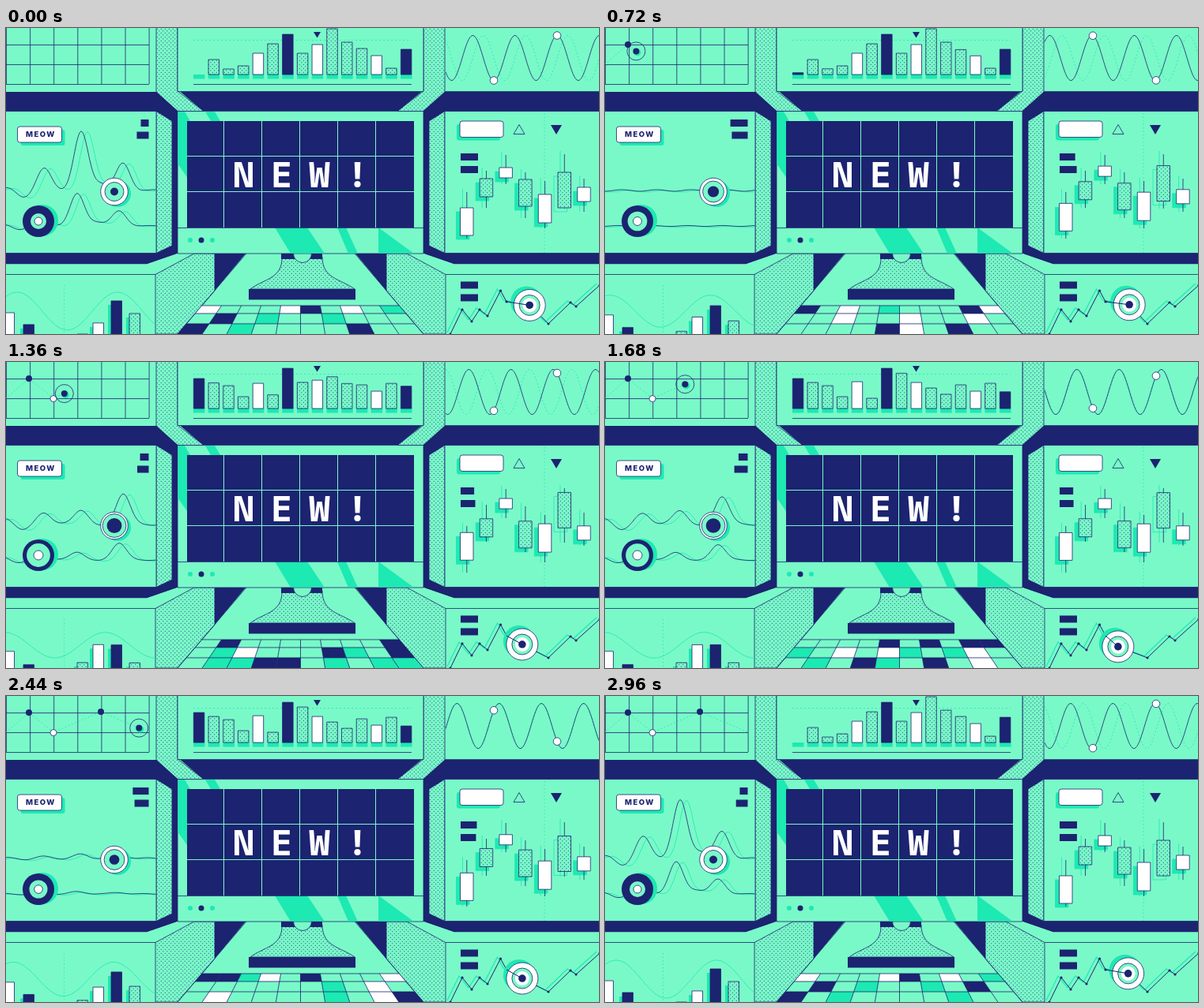
These frames come from a looping animation (750x388 px, 3 s). An HTML page with a canvas:

```html
<!DOCTYPE html>
<html lang="en">
<head>
<meta charset="utf-8">
<title>Dashboard wall</title>
<style>
html, body { margin: 0; width: 100%; height: 100%; overflow: hidden; background: #79f9c8 }
canvas { display: block }
</style>
</head>
<body>
<canvas id="stage" width="750" height="388"></canvas>
<script>
const c = document.getElementById('stage').getContext('2d');
const MINT = '#79f9c8', TEAL = '#1de9b2', NAVY = '#1c2370', WHITE = '#fff';
const LOOP = 3000, TAU = Math.PI * 2;

const tile = document.createElement('canvas');
tile.width = tile.height = 5;
const tc = tile.getContext('2d');
tc.fillStyle = MINT;
tc.fillRect(0, 0, 5, 5);
tc.fillStyle = NAVY;
for (const p of [1.25, 3.75]) {
  tc.beginPath();
  tc.arc(p, p, .55, 0, TAU);
  tc.fill();
}
const DOTS = c.createPattern(tile, 'repeat');

// Motion: a seeded random number, an eased ramp and a cosine that fits the loop.
const random = n => { const s = Math.sin(n * 12.9898 + 4) * 43758.5453; return s - Math.floor(s); };
const ramp = (t, from, to) => {
  const u = Math.min(1, Math.max(0, (t - from) / (to - from)));
  return u * u * (3 - 2 * u);
};
const sway = (t, delay = 0, turns = 1) => Math.cos((t - delay) / LOOP * TAU * turns);
const breath = t => .5 - .5 * sway(t);

function paint(fill, stroke, width = .8) {
  if (fill) { c.fillStyle = fill; c.fill(); }
  if (stroke) { c.strokeStyle = stroke; c.lineWidth = width; c.stroke(); }
}
function trace(pts) {
  c.beginPath();
  pts.forEach(([x, y]) => c.lineTo(x, y));
}
function poly(pts, fill, stroke) { trace(pts); c.closePath(); paint(fill, stroke); }
function line(pts, color = NAVY, dash = [], width) {
  c.setLineDash(dash);
  trace(pts);
  paint(null, color, width);
  c.setLineDash([]);
}
function box(x, y, w, h, fill, stroke, r = 0) {
  c.beginPath();
  c.roundRect(x, y, w, h, r);
  paint(fill, stroke);
}
function disc(x, y, r, fill, stroke) {
  c.beginPath();
  c.arc(x, y, r, 0, TAU);
  paint(fill, stroke);
}
function both(pts, fill, stroke) {
  poly(pts, fill, stroke);
  poly(pts.map(([x, y]) => [745 - x, y]), fill, stroke);
}
function curve(x0, x1, f, color, dash) {
  const pts = [];
  for (let x = x0; x <= x1; x++) pts.push([x, f(x)]);
  line(pts, color, dash);
}
function clip(x, y, w, h, draw) {
  c.save();
  c.beginPath();
  c.rect(x, y, w, h);
  c.clip();
  draw();
  c.restore();
}
function button(x, y, w, h, shift) {
  box(x + shift, y + 4, w, h, TEAL, null, 3);
  box(x, y, w, h, WHITE, NAVY, 3);
}

function room() {
  c.fillStyle = MINT;
  c.fillRect(0, 0, 750, 388);
  both([[190, -5], [217, -5], [217, 80], [250, 105.5], [217, 105.5], [190, 81]], DOTS, NAVY);
  both([[-10, 81], [190, 81], [217, 105], [217, 286], [178, 299.5], [-10, 299.5]], NAVY);
  both([[190, 105.5], [210, 118], [210, 276], [190, 285.5]], DOTS, NAVY);
  both([[-10, 105.5], [190, 105.5], [190, 285.5], [-10, 285.5]], MINT, NAVY);
  both([[178, 299.5], [217, 286], [238, 286], [189, 312.5], [-10, 312.5], [-10, 299.5]], MINT);
  both([[189, 312.5], [238, 286], [264, 286], [264, 333], [217, 388], [189, 388]], DOTS, NAVY);
  both([[264, 286], [303, 286], [264, 333]], NAVY);
  line([[0, 312.5], [189, 312.5]]);
  line([[556, 312.5], [750, 312.5]]);
  poly([[220, 80.5], [526, 80.5], [496, 105], [249, 105]], NAVY);
  poly([[217, -5], [528, -5], [528, 80.5], [217, 80.5]], MINT, NAVY);
  line([[555, 80.5], [750, 80.5]]);
}

function floor(t) {
  const ys = [352, 362, 375, 389];
  const at = (i, y) => 372.5 + (i - 5) * .1703 * (y - 205.4);
  for (let j = 0; j < 3; j++) {
    for (let i = 0; i < 10; i++) {
      const id = j * 10 + i, a = ys[j], b = ys[j + 1];
      const beat = Math.floor(t / LOOP * 6 + random(id)) % 6;
      const color = [NAVY, WHITE, TEAL][Math.floor(random(id * 6 + beat + 50) * 7)];
      if (color) poly([[at(i, a), a], [at(i + 1, a), a], [at(i + 1, b), b], [at(i, b), b]], color);
    }
  }
  for (let i = 0; i <= 10; i++) {
    const top = i % 10 ? 352 : 286;
    line([[at(i, top), top], [at(i, 388), 388]]);
  }
  for (const y of ys) line([[at(0, y), y], [at(10, y), y]]);
}

function monitor() {
  c.beginPath();
  c.moveTo(349, 290);
  c.bezierCurveTo(350, 318, 326, 318, 309, 331);
  c.lineTo(441, 331);
  c.bezierCurveTo(423, 318, 400, 318, 400, 290);
  paint(DOTS, NAVY);
  box(307, 331, 135, 13.5, NAVY);
  box(348, 286, 52, 7, NAVY);
  disc(375, 286, 11.5, MINT, NAVY);
  box(217, 105.5, 311, 180.5, MINT, NAVY);
  clip(217.5, 106, 310, 179.5, () => {
    poly([[217, 106], [226, 106], [240, 130], [240, 205], [217, 172]], TEAL);
    poly([[252, 106], [264, 106], [271, 118], [259, 118]], TEAL);
    poly([[340, 253], [381, 253], [403, 286], [360, 286]], TEAL);
    poly([[419, 253], [430, 253], [445, 286], [433, 286]], TEAL);
    poly([[471, 253], [516, 286], [471, 286]], TEAL);
  });
  line([[217, 253.5], [528, 253.5]]);
  box(229, 118, 287, 135, NAVY);
  for (let i = 1; i < 6; i++) line([[227.5 + i * 48, 118], [227.5 + i * 48, 253]], MINT, [], 1);
  for (const y of [162.5, 207.5]) line([[229, y], [516, y]], MINT, [], 1);
  disc(233, 269, 3, TEAL);
  disc(247, 269, 3.5, NAVY);
  disc(261, 269, 3, TEAL);
  c.fillStyle = WHITE;
  c.font = '700 45px "Noto Sans Mono", "DejaVu Sans Mono", monospace';
  c.textAlign = 'center';
  [...'NEW!'].forEach((ch, i) => c.fillText(ch, 300.5 + i * 48, 202));
}

// Cursor path: time, x, y.
const STOPS = [[200, -14, 58], [560, 29, 21], [1040, 60, 46], [1200, 60, 46],
  [1900, 120, 20], [2100, 120, 20], [2680, 202, 55]];
function plot(t) {
  for (let i = 0; i < 7; i++) line([[.5 + i * 30.1, 0], [.5 + i * 30.1, 71]]);
  for (const y of [21.5, 46.5, 71.5]) line([[0, y], [181, y]]);
  const i = STOPS.findLastIndex(s => s[0] <= t);
  if (i < 0) return;
  const [t0, x0, y0] = STOPS[i];
  const [t1, x1, y1] = STOPS[i + 1] ?? [LOOP, x0, y0];
  const u = (t - t0) / (t1 - t0);
  const x = x0 + (x1 - x0) * u, y = y0 + (y1 - y0) * u;
  clip(0, 0, 181, 71, () => {
    line([...STOPS.slice(0, i + 1).map(s => s.slice(1)), [x, y]], TEAL, [2, 2.5]);
  });
  if (i >= 1) disc(29, 21, 4, NAVY);
  if (i >= 3) disc(60, 46.5, 4, WHITE, NAVY);
  if (i >= 5) disc(120, 20, 4, NAVY);
  clip(0, 0, 189, 80, () => {
    disc(x, y, 11.5, null, NAVY);
    disc(x + 1.5, y + 1.5, 4.5, TEAL);
    disc(x, y, 4, NAVY);
  });
}

// Bar heights at the two ends of their move.
const RESTING = [0, 19, 7, 11, 27, 39, 51, 27, 38, 58, 41, 33, 24, 8, 32];
const MOVED = [38, 33, 29, 15, 34, 13, 51, 45, 33, 26, 18, 30, 22, 32, 21];
function barChart(t) {
  line([[237, 15.5], [513, 15.5]], TEAL, [2, 3]);
  RESTING.forEach((rest, i) => {
    const start = 250 + random(i) * 900;
    const move = ramp(t, start, start + 600) - ramp(t, 2480, 2960);
    const x = 237 + i * 18.72, h = rest + (MOVED[i] - rest) * move;
    const fill = [0, 6, 14].includes(i) ? NAVY : [4, 8, 12].includes(i) ? WHITE : DOTS;
    box(x, 59, 14.5, 5.5, TEAL);
    if (h > .5) box(x + .3, 59 - h, 13.5, h, fill, NAVY);
  });
  line([[237, 71.5], [513, 71.5]]);
  poly([[389, 5], [398, 5], [393.5, 12.5]], NAVY);
}

function sines(t) {
  const a = Math.PI + t / LOOP * 2 * TAU;
  const wave = phase => x => 38 - 28.5 * Math.cos((x - 617) / 53.4 * TAU - phase);
  clip(556, 0, 194, 80, () => {
    curve(556, 750, wave(1.58 - a), TEAL, [2, 2.5]);
    curve(556, 750, wave(a), NAVY);
    for (const x of [617, 697]) disc(x, wave(a)(x), 4.8, WHITE, NAVY);
  });
}

// Bumps of the trace: centre, height in the first pulse, height in the second.
const BUMPS = [[0, 4, 9], [22, -9, -8], [48, 28, 17], [95, 74, 20], [120, 9, -3], [148, 34, 44]];
function pulse(t) {
  const power = (.5 + .5 * sway(t, 0, 2)) ** 1.3, blend = breath(t);
  return x => BUMPS.reduce((sum, [m, first, second]) =>
    sum + power * (first + (second - first) * blend) * Math.exp(-(((x - m) / 9) ** 2) / 2),
    Math.sin(x / 7 - t / LOOP * TAU));
}

function leftPanel(t) {
  const f = pulse(t), b = breath(t);
  clip(0, 106, 189.5, 179, () => {
    for (const trace of [x => 206 - f(x), x => 251 - .55 * f(x + 5)]) {
      curve(0, 190, x => trace(x - 8) + 1, TEAL);
      curve(0, 190, trace, NAVY);
    }
  });
  disc(141, 210, 17, TEAL);
  disc(137, 207.5, 17.3, WHITE, NAVY);
  disc(137, 207.5, 12 + 3 * b, MINT, NAVY);
  disc(137, 207.5, 5 + 4.5 * b, NAVY);
  disc(46, 244, 20, TEAL);
  disc(41, 245, 20, NAVY);
  disc(41, 245, 10 + 5 * b, MINT);
  disc(41, 245, 5 + b, WHITE, NAVY);

  button(14.5, 125, 56, 20, 4);
  c.fillStyle = NAVY;
  c.font = '800 9.5px Inter, sans-serif';
  c.textAlign = 'left';
  c.letterSpacing = '1.5px';
  c.fillText('MEOW', 25, 138.3);
  c.letterSpacing = '0px';
  const upper = 16 - 6 * sway(t, 0, 2), lower = 17.5 + 3 * sway(t, 600, 2);
  box(180.5 - upper, 116, upper, 9, NAVY);
  box(180.5 - lower, 131.5, lower, 9, NAVY);
}

// Candles: height, mean top and how far it drifts.
const CANDLES = [[35, 222, 6], [23, 195, -4], [13, 175, 2], [34, 197, -5], [36, 208, 3], [45, 174, 9], [18, 205, -3]];
function rightPanel(t) {
  button(574, 118, 55, 20.5, -4);
  poly([[649, 122.5], [656, 134.5], [642, 134.5]], null, NAVY);
  poly([[689, 123], [703, 123], [696, 135]], NAVY);
  line([[681, 108], [681, 285]], TEAL, [1.5, 3]);
  box(575, 159, 19.5 + 2.5 * sway(t), 9, NAVY);
  box(575, 175, 20 + 2.5 * sway(t, 300), 9, NAVY);
  CANDLES.forEach(([h, mean, drift], i) => {
    const x = 574.5 + i * 24.7, y = mean + drift * sway(t);
    const top = mean - 14, end = mean + h + 10;
    line([[x + 3, top - 4], [x + 3, end]], TEAL);
    box(x - 5, y + 5, 16.5, h, i === 5 ? null : TEAL, TEAL);
    line([[x + 8.3, top], [x + 8.3, end]]);
    box(x, y, 16.5, h, i % 2 ? DOTS : WHITE, NAVY);
  });
}

// Low bars: left edge, fill, top and how far it sinks.
const LOW_BARS = [[-3, WHITE, 361, 6], [22, NAVY, 376, 8], [90, DOTS, 388, -7],
  [110, WHITE, 374, -16], [133, NAVY, 346, 13], [156, DOTS, 362, 20]];
function lowerLeft(t) {
  clip(0, 313, 189, 75, () => {
    const peak = 133 + 8 * sway(t), size = 20 + 4 * sway(t);
    line([[73.5, 326], [73.5, 388]], TEAL, [1.5, 3]);
    curve(0, 189, x => 359 - size * Math.cos((x - peak) / 127 * TAU), TEAL);
    for (const [x, fill, top, sink] of LOW_BARS) {
      const y = top + sink * breath(t);
      box(x - 4, y + 5, 13, 60, TEAL);
      box(x, y, 13.5, 60, fill, NAVY);
    }
  });
}

function lowerRight(t) {
  box(575, 321.5, 22, 9, NAVY);
  box(575, 337.5, 22, 9, NAVY);
  const k = sway(t, 400), x = 656.5 + 8.5 * k, y = 355.5 - 6 * k;
  const pts = [[562, 388], [577, 357], [589, 372], [599, 357], [609, 365], [625.5, 333], [633, 347],
    [x, y], [686, 375], [714, 348], [721, 353], [751, 326]];
  clip(556, 313, 194, 75, () => {
    line(pts.map(([a, b]) => [a - 4, b - 2]), TEAL, [], 1.2);
    line(pts, NAVY, [], 1);
    pts.forEach(p => disc(...p, 1.6, NAVY));
    disc(x - 4, y - 4, 20, TEAL);
    disc(x, y, 20, WHITE, NAVY);
    disc(x, y, 13, MINT, NAVY);
    disc(x, y, 9, WHITE);
    disc(x, y, 4.8, NAVY);
    line([[633, 347], [x, y]], NAVY, [], 1);
  });
}

function frame() {
  const t = performance.now() % LOOP;
  room();
  floor(t);
  monitor();
  for (const part of [plot, barChart, sines, leftPanel, rightPanel, lowerLeft, lowerRight]) part(t);
  requestAnimationFrame(frame);
}
frame();
</script>
</body>
</html>
```
